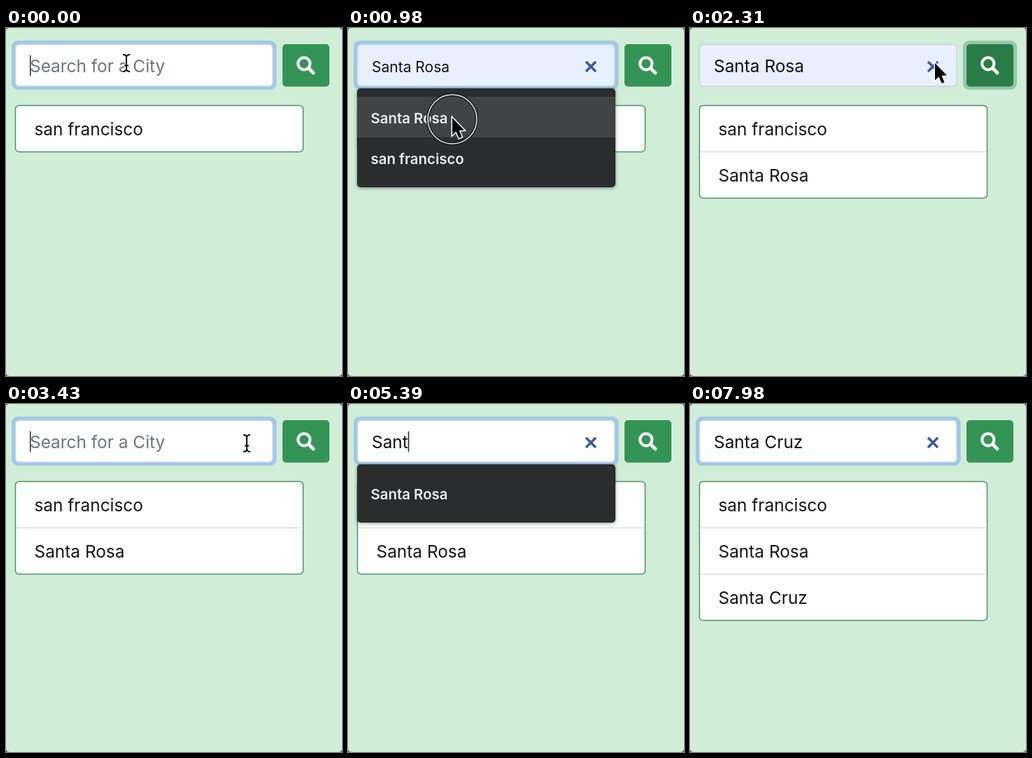
Animation, 480 px wide and 496 px high, one loop 8 s. Source, as an HTML page with a canvas:

```html
<!DOCTYPE html>
<html lang="en">
<head>
<meta charset="utf-8">
<title>City search</title>
<style>
  html, body { margin: 0; width: 100%; height: 100%; overflow: hidden; background: #66766c; }
  canvas { display: block; }
</style>
</head>
<body>
<canvas id="stage" width="480" height="496"></canvas>
<script>
const ctx = document.getElementById('stage').getContext('2d');
const LOOP = 8000;
const FONT = 'Inter, "Open Sans", sans-serif';
const GREEN = '#349456';

// Field content over time: [time, text]
const TYPED = [
  [0, ''], [1085, 'Santa Rosa'], [2400, ''], [4150, 'S'], [4480, 'Sa'], [4750, 'San'],
  [5110, 'Sant'], [5670, 'Santa'], [5880, 'Santa '], [6050, 'Santa C'],
  [6510, 'Santa Cr'], [6620, 'Santa Cru'], [6990, 'Santa Cruz']
];
// Pointer stops: [time, x, y]
const PATH = [
  [0, 172, 50], [420, 172, 50], [840, 149, 128], [1120, 149, 128], [1610, 430, 56],
  [1960, 430, 56], [2300, 350, 50], [2450, 350, 50], [2900, 344, 56], [LOOP, 344, 56]
];
const CLICKS = [280, 910, 1700, 2370];
const HISTORY = ['Santa Rosa', 'san francisco'];
const SAVED = [[0, 'san francisco'], [1750, 'Santa Rosa'], [7700, 'Santa Cruz']];

const clamp = v => Math.max(0, Math.min(1, v));
const smooth = v => v * v * (3 - 2 * v);

function pointerAt(t) {
  const i = PATH.findIndex(p => p[0] > t);
  const [t0, x0, y0] = PATH[i - 1], [t1, x1, y1] = PATH[i];
  const k = smooth((t - t0) / (t1 - t0));
  return { x: x0 + (x1 - x0) * k, y: y0 + (y1 - y0) * k };
}

function box(x, y, w, h, r, fill, stroke) {
  ctx.beginPath();
  ctx.roundRect(x, y, w, h, r);
  if (fill) { ctx.fillStyle = fill; ctx.fill(); }
  if (stroke) { ctx.strokeStyle = stroke; ctx.lineWidth = 1.5; ctx.stroke(); }
}

function label(text, x, y, size, color, weight = 400) {
  ctx.font = `${weight} ${size}px ${FONT}`;
  ctx.fillStyle = color;
  ctx.fillText(text, x, y);
}

function lines(points, color, width) {
  ctx.beginPath();
  points.forEach(([x, y], i) => i % 2 ? ctx.lineTo(x, y) : ctx.moveTo(x, y));
  ctx.strokeStyle = color;
  ctx.lineWidth = width;
  ctx.stroke();
}

function focusRing(alpha, x, w, color) {
  ctx.globalAlpha = alpha;
  box(x, 18, w, 70, 9, color);
  ctx.globalAlpha = 1;
}

function drawButton(focus, hover) {
  focusRing(focus, 390, 77, '#95c9a8');
  box(395, 23, 67, 60.5, 5, focus > 0.5 || hover ? '#2b7d47' : GREEN);
  ctx.beginPath();
  ctx.arc(425.8, 50.8, 8.6, 0, 7);
  ctx.strokeStyle = '#fff';
  ctx.lineWidth = 4;
  ctx.stroke();
  ctx.lineCap = 'round';
  lines([[433, 58], [439, 64]], '#fff', 4.8);
  ctx.lineCap = 'butt';
}

function drawField(text, preview, autofilled, focus, caret) {
  focusRing(focus, 8, 378.5, '#a2c7e4');
  box(13.5, 23.5, 367.5, 59.5, 5, autofilled ? '#e8f0fe' : '#fff', focus > 0.5 ? '#bcd5f2' : '#ced4da');
  if (preview) label(preview, 34, 62.5, 21, '#111');
  else label(text || 'Search for a City', 34, 62.5, 24.4, text ? '#111' : '#6c757d');
  if (text || preview) lines([[340, 48], [354, 62], [354, 48], [340, 62]], '#3d599c', 3.6);
  if (caret) {
    ctx.font = `400 24.4px ${FONT}`;
    ctx.fillStyle = '#222';
    ctx.fillRect(34 + ctx.measureText(text).width, 39, 1.5, 29);
  }
}

function drawList(items) {
  box(13.5, 110.5, 411, 66 * items.length, 5, '#fff', '#47936a');
  items.forEach((item, i) => {
    const y = 110.5 + 66 * i;
    if (i) lines([[14.5, y], [423.5, y]], '#dcdfdd', 1.5);
    label(item, 40.5, y + 42.5, 24.4, '#151515');
  });
}

function drawDropdown(items, active) {
  ctx.save();
  ctx.shadowColor = 'rgba(0,0,0,.45)';
  ctx.shadowBlur = 5;
  ctx.shadowOffsetY = 1;
  box(13, 86, 369, 25 + 58 * items.length, 5, '#2a2c2e');
  ctx.restore();
  items.forEach((item, i) => {
    if (i === active) box(13, 98 + 58 * i, 369, 58, 0, '#424345');
    label(item, 32.5, 135.5 + 58 * i, 20.4, '#ececec', 600);
  });
}

function drawArrow(x, y) {
  const shape = [[0, 0], [0, 24.5], [5.5, 19.5], [9.6, 29], [13.6, 27.3], [9.6, 18], [17, 17.6]];
  ctx.beginPath();
  shape.forEach(([dx, dy]) => ctx.lineTo(x + dx, y + dy));
  ctx.closePath();
  ctx.strokeStyle = '#fff';
  ctx.lineWidth = 3;
  ctx.stroke();
  ctx.fillStyle = '#000';
  ctx.fill();
}

function drawBeam(x, y) {
  for (const [color, width] of [['#fff', 4], ['#111', 2]]) {
    ctx.beginPath();
    for (const s of [-1, 1]) {
      ctx.moveTo(x - 5, y + 12 * s);
      ctx.quadraticCurveTo(x, y + 12 * s, x, y + 8 * s);
      ctx.quadraticCurveTo(x, y + 12 * s, x + 5, y + 12 * s);
    }
    ctx.moveTo(x, y - 9);
    ctx.lineTo(x, y + 9);
    ctx.moveTo(x - 3, y + 3.5);
    ctx.lineTo(x + 3, y + 3.5);
    ctx.strokeStyle = color;
    ctx.lineWidth = width;
    ctx.stroke();
  }
}

function drawClick(t, { x, y }) {
  const start = CLICKS.find(c => t >= c && t < c + 260);
  if (start === undefined) return;
  ctx.globalAlpha = clamp((start + 260 - t) / 100);
  ctx.beginPath();
  ctx.arc(x, y + 2, 35, 0, 7);
  for (const [color, width] of [['#1b1b1b', 4.5], ['#e4e4e4', 1.6]]) {
    ctx.strokeStyle = color;
    ctx.lineWidth = width;
    ctx.stroke();
  }
  ctx.globalAlpha = 1;
}

function draw(t) {
  const [since, text] = TYPED.findLast(e => e[0] <= t);
  const mouse = pointerAt(t);
  const typing = t >= 4150;
  const buttonFocus = clamp((t - 1720) / 150) * clamp((2550 - t) / 150);
  const fieldFocused = t < 1720 || t >= 2400;
  const fieldFocus = t < 2400 ? clamp((1870 - t) / 150) : clamp((t - 2400) / 150);

  let options = [];
  if (t >= 350 && t < 1085) options = HISTORY;
  else if (typing && t < 7630) options = HISTORY.filter(c => c.startsWith(text) || c.startsWith(text.toLowerCase()));
  const row = Math.floor((mouse.y - 98) / 58);
  const active = !typing && options[row] ? row : -1;
  const preview = active >= 0 ? options[active] : '';
  const caret = fieldFocused && !preview && (t - since) % 1000 < 500;

  ctx.clearRect(0, 0, 480, 496);
  box(0, 0, 480, 496, 5, '#d0edd7');
  drawButton(buttonFocus, mouse.x > 395 && mouse.y < 84);
  drawField(text, preview, preview || text === 'Santa Rosa', fieldFocus, caret);
  drawList(SAVED.filter(s => s[0] <= t).map(s => s[1]));
  if (options.length) drawDropdown(options, active);

  if (typing) return;
  drawClick(t, mouse);
  const overClear = text && Math.abs(mouse.x - 347) < 14;
  const overField = mouse.x < 381 && mouse.y < 84;
  (overField && !overClear ? drawBeam : drawArrow)(mouse.x, mouse.y);
}

function tick() {
  draw(performance.now() % LOOP);
  requestAnimationFrame(tick);
}
tick();
</script>
</body>
</html>
```
